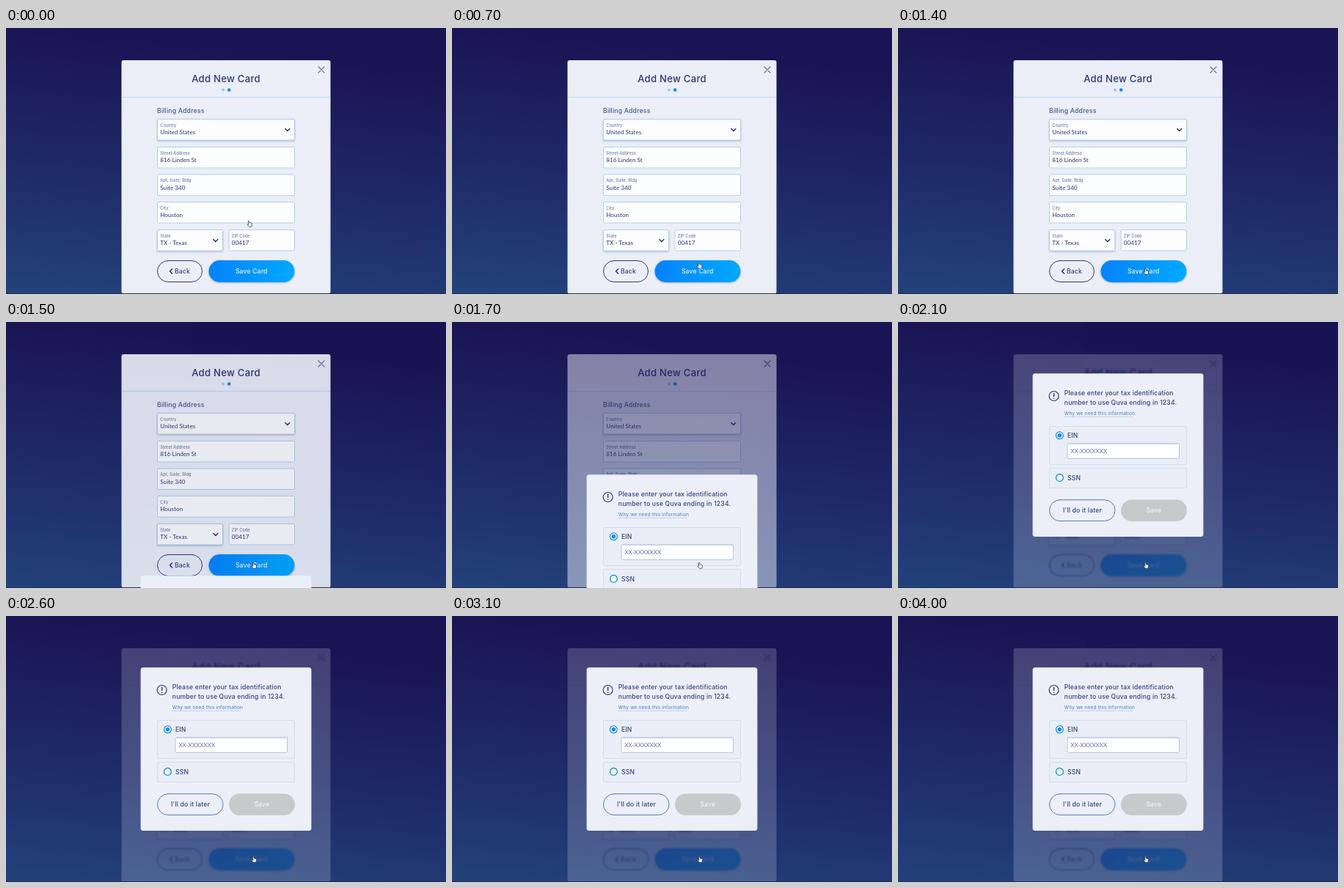
These frames come from a looping animation (600x363 px, 4100 ms). An HTML page:

```html
<!DOCTYPE html>
<html lang="en">
<head>
<meta charset="utf-8">
<title>Add New Card</title>
<style>
  html, body { margin: 0; width: 100%; height: 100%; overflow: hidden; background: #1d2464; }
  svg { display: block; width: 600px; height: 363px; }
  text { font: 500 8.6px Inter, "Open Sans", sans-serif; letter-spacing: .02em; fill: #34427f; }
  .title { font-size: 13.1px; fill: #2d3772; }
  .section { font-size: 8.7px; fill: #4b568b; }
  .label { font-size: 5.5px; fill: #6d7aa8; }
  .value { font: 400 8.15px Lato, "Open Sans", sans-serif; letter-spacing: 0; fill: #2d3772; }
  .hint { fill: #66739f; }
  .link { font-size: 6.6px; font-weight: 400; fill: #4a7cc8; }
  .mid { text-anchor: middle; }
  .light { fill: #f3f5fa; }
  .field { fill: #fcfdfe; stroke: #b3d0ee; }
  .option { fill: #eaedf6; stroke: #d0dff0; }
  .line { fill: none; stroke: #2d3772; stroke-linecap: round; stroke-linejoin: round; }
  .thin { stroke: #5d76b0; }
  .drop { filter: drop-shadow(0 1px 1px rgba(50, 70, 130, .35)); }

  .anim { animation: 4100ms step-end infinite; }
  #cursor { animation-name: point; }
  #modal { animation-name: rise; }
  #shade { animation-name: dim; }
  #form { animation-name: soften; }

  /* The pointer eases from the city field to the button at ten steps a second. */
  @keyframes point {
    0% { transform: translate(-6px, -65px); }
    2.43% { transform: translate(-5.8px, -62.8px); }
    4.87% { transform: translate(-5.2px, -56.8px); }
    7.31% { transform: translate(-4.4px, -48.2px); }
    9.75% { transform: translate(-3.5px, -37.9px); }
    12.19% { transform: translate(-2.5px, -27.1px); }
    14.63% { transform: translate(-1.6px, -16.8px); }
    17.07% { transform: translate(-.8px, -8.2px); }
    19.51% { transform: translate(-.2px, -2.2px); }
    21.95%, 100% { transform: none; }
  }
  @keyframes rise {
    0% { transform: translateY(310px); }
    36.58% { transform: translateY(276px); }
    41.46% { transform: translateY(138px); }
    43.9%, 100% { transform: none; }
  }
  @keyframes dim {
    0% { opacity: 0; }
    36.58% { opacity: .09; }
    41.46% { opacity: .5; }
    43.9% { opacity: .72; }
    51.21% { opacity: .785; animation-timing-function: steps(5); }
    63.41%, 100% { opacity: .8; }
  }
  @keyframes soften {
    0% { filter: none; }
    43.9% { filter: blur(.6px); }
    51.21% { filter: blur(.9px); animation-timing-function: steps(5); }
    63.41%, 100% { filter: blur(1.2px); }
  }
</style>
</head>
<body>
<svg viewBox="0 0 600 363">
  <defs>
    <linearGradient id="sky" gradientUnits="userSpaceOnUse" x1="40" y1="0" x2="0" y2="363">
      <stop stop-color="#1b1454"/>
      <stop offset=".5" stop-color="#1f2968"/>
      <stop offset="1" stop-color="#23437b"/>
    </linearGradient>
    <linearGradient id="blue">
      <stop stop-color="#0583fb"/>
      <stop offset="1" stop-color="#02a9ff"/>
    </linearGradient>
    <path id="chevron" class="line" d="M-3-1.5 0 1.5 3-1.5" stroke-width="1.5"/>
  </defs>

  <rect width="600" height="363" fill="url(#sky)"/>
  <rect x="157.5" y="44" width="285" height="318.5" rx="3" fill="#ebeef7"/>

  <g id="form" class="anim">
    <path d="M158 94.5h284" stroke="#b9d9f5"/>
    <text class="title mid" x="300" y="74">Add New Card</text>
    <path class="line" d="M426 53l8 8m0-8l-8 8" style="stroke:#66709f" stroke-width="1.2"/>
    <circle cx="296" cy="84.5" r="2" fill="#a8c0e4"/>
    <circle cx="304.2" cy="84.5" r="2.3" fill="#0c8df2"/>
    <text class="section" x="206" y="116">Billing Address</text>
    <g id="fields"></g>
    <use href="#chevron" x="383.8" y="139"/>
    <use href="#chevron" x="285.8" y="290"/>
    <rect x="206.5" y="317.5" width="61" height="29" rx="14.5" class="line"/>
    <path class="line" d="M226.5 329l-3 3 3 3" stroke-width="1.7"/>
    <text x="230" y="335">Back</text>
    <rect x="276.5" y="317" width="117" height="30" rx="15" fill="url(#blue)" class="drop"/>
    <text class="mid light" x="334.7" y="335">Save Card</text>
  </g>
  <rect id="shade" class="anim" width="600" height="363" fill="url(#sky)"/>
  <rect y="362" width="600" height="1" fill="#22294a"/>

  <g id="modal" class="anim">
    <rect x="183.6" y="70.2" width="232.8" height="222.7" rx="3.5" fill="#eceff8"/>
    <circle cx="212.6" cy="101" r="6.5" class="line" stroke-width="1.15"/>
    <path class="line" d="M212.6 97.5v4M212.6 104.3v.1" stroke-width="1.4"/>
    <text x="226.8" y="100">Please enter your tax identification</text>
    <text x="226.8" y="112.5">number to use Quva ending in 1234.</text>
    <text class="link" x="226.8" y="127">Why we need this information</text>
    <path d="M227 129.5h94" stroke="#86abe0" stroke-width=".8" stroke-dasharray="1 1"/>

    <rect class="option" x="206.5" y="142.5" width="187" height="52" rx="1.5"/>
    <rect class="option" x="206.5" y="199.5" width="187" height="27" rx="1.5"/>
    <g fill="#fafcff" stroke="#128fdd" stroke-width="1.3">
      <circle cx="220.4" cy="154.8" r="4.9"/>
      <circle cx="220.4" cy="212.4" r="4.9"/>
    </g>
    <circle cx="220.4" cy="154.8" r="2.8" fill="#128fdd"/>
    <text x="231" y="158">EIN</text>
    <text x="231" y="215.6">SSN</text>
    <rect x="231" y="165.7" width="152.5" height="20.6" rx="1.5" fill="#fdfeff" stroke="#b4c3dd"/>
    <path d="M231.5 166.7h151.5" stroke="#d0d8e8"/>
    <text class="value hint" x="235.2" y="179">XX-XXXXXXX</text>

    <rect x="206.5" y="242.7" width="89.5" height="28.8" rx="14.4" class="line thin"/>
    <text class="mid" x="251.5" y="260.3">I'll do it later</text>
    <rect x="304" y="242.5" width="90" height="29.5" rx="14.75" fill="#c8c9cb"/>
    <text class="mid light" x="348.8" y="260.3">Save</text>
  </g>

  <g id="cursor" class="anim">
    <path d="M336.2 328.6q1-.8 1.5.4l.7 2 2 .2q1.2.3 1.1 1.6l-.3 2.2-.8 1.3h-2.8l-2.5-2.6q-.4-1.1.9-.9l1 .5z"
      fill="#fff" stroke="#30374f" stroke-width=".8" stroke-linejoin="round"/>
  </g>
</svg>
<script>
  const fields = [
    [206.5, 124.5, 187, "Country", "United States", "drop"],
    [206.5, 162.5, 187, "Street Address", "816 Linden St"],
    [206.5, 200, 187, "Apt, Suite, Bldg", "Suite 340"],
    [206.5, 237.5, 187, "City", "Houston"],
    [206.5, 275.5, 89, "State", "TX - Texas", "drop"],
    [304, 275.5, 89.5, "ZIP Code", "00417"]
  ];
  document.getElementById("fields").innerHTML = fields.map(([x, y, w, label, value, extra = ""]) => `
    <rect class="field ${extra}" x="${x}" y="${y}" width="${w}" height="28.5" rx="1.5"/>
    <text class="label" x="${x + 3.8}" y="${y + 10}">${label}</text>
    <text class="value" x="${x + 3.8}" y="${y + 20.7}">${value}</text>`).join("");
</script>
</body>
</html>
```
